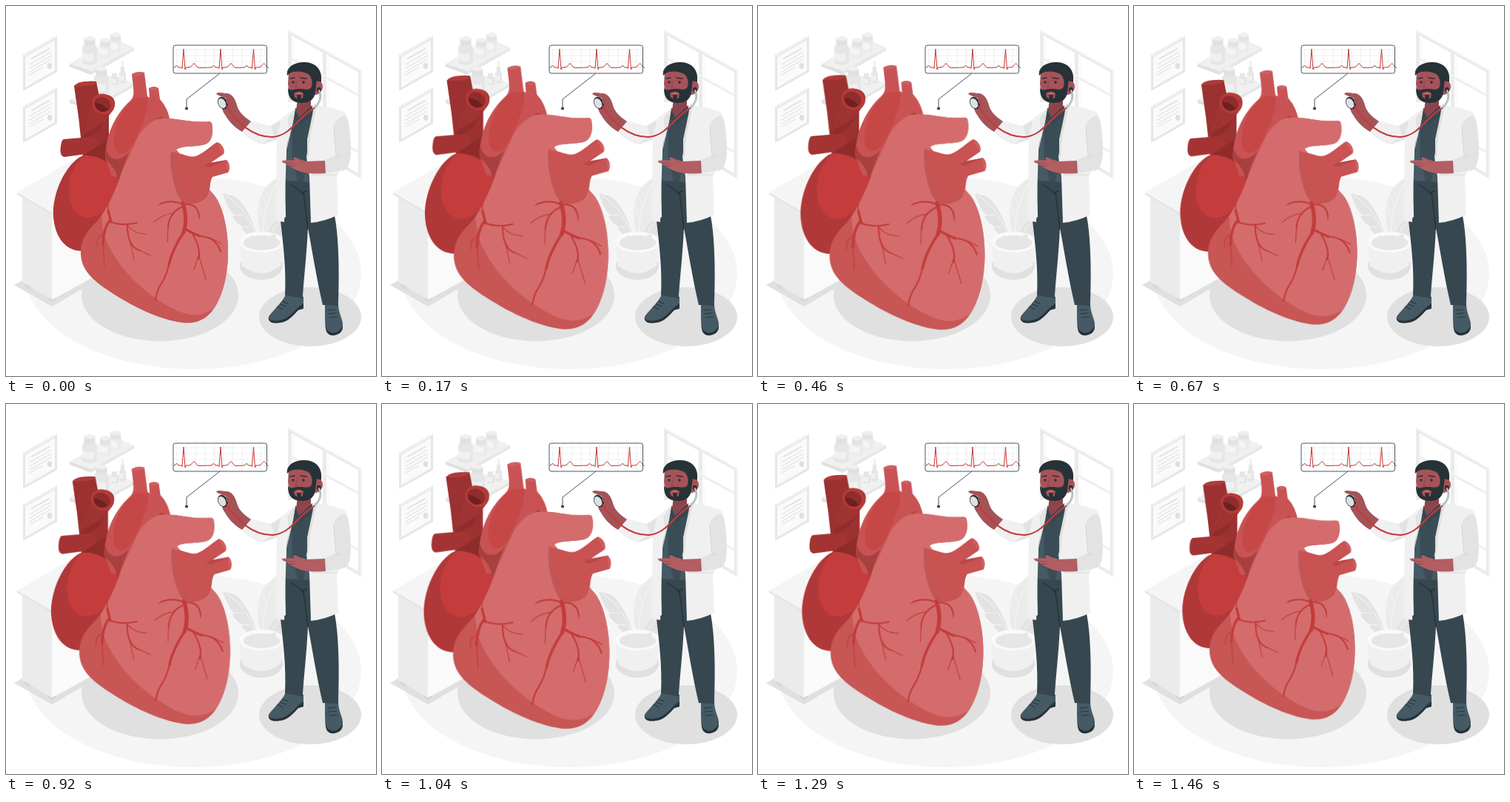
Recreate the animation shown at these times as an HTML page. Size 500 px wide and 500 px high, loop 1.54 s.

```html
<!DOCTYPE html>
<html lang="en">
<head>
<meta charset="utf-8">
<title>Heart check</title>
<style>
html, body { margin: 0; height: 100%; overflow: hidden; background: #fff; }
svg { display: block; width: 100vw; height: 100vh; }
#heart { transform-origin: 183px 258.5px; }
.line { fill: none; stroke-linecap: round; stroke-linejoin: round; }
.skin { fill: #a65358; }
.dark { fill: #263238; }
</style>
</head>
<body>
<svg viewBox="0 0 500 500">
  <defs>
    <g id="paper">
      <path fill="#e6e6e6" d="M23 66 69 40V89L23 115Z"/>
      <path fill="#f0f0f0" d="M23 66 69 40 67 44 25 68Z"/>
      <path fill="#fafafa" d="M26 69 66 46V87L26 110Z"/>
      <path class="line" stroke="#e0e0e0" stroke-width="2" d="M35 71 58 58"/>
      <path class="line" stroke="#e3e3e3" stroke-width="1.2" d="M32 79 61 62M32 84 61 67M32 89 61 72M32 93 50 83"/>
      <ellipse cx="59" cy="81" rx="3.2" ry="4" fill="#e0e0e0"/>
    </g>
    <g id="jar">
      <path fill="#ebebeb" d="M-8 0V14A8 4 0 0 0 8 14V0Z"/>
      <path fill="#f5f5f5" d="M-8 4V11A8 4 0 0 0 3 14V7Z"/>
      <path fill="#e3e3e3" d="M-7-6V0A7 3.500 0 0 0 7 0V-6Z"/>
      <ellipse cy="-6" rx="7" ry="3" fill="#f0f0f0"/>
    </g>
    <g id="bottle">
      <path fill="#e6e6e6" d="M-7-1C-7 2-10 2-10 6V24A10 5 0 0 0 10 24V6C10 2 7 2 7-1Z"/>
      <path fill="#f0f0f0" d="M-10 9A10 5 0 0 0 6 13V23A10 5 0 0 1-10 19Z"/>
      <path fill="#e0e0e0" d="M-7.500-7V-1A7.500 3.500 0 0 0 7.500-1V-7Z"/>
      <ellipse cy="-7" rx="7.500" ry="3" fill="#f0f0f0"/>
    </g>
    <g id="shelf">
      <path fill="#f0f0f0" d="M86 78 145 44 173 56 115 88Z"/>
      <path fill="#e0e0e0" d="M86 78 115 88V93L86 82Z"/>
      <path fill="#e6e6e6" d="M115 88 173 56V60L115 93Z"/>
    </g>
    <path id="body" d="M278 158C281 172 278 184 269 187 255 191 238 188 230 194L278 252C293 266 301 304 300 337 299 370 291 394 281 409 271 424 256 430 239 428 206 424 168 404 142 387 116 370 101 356 101 333 101 318 108 306 119 295 132 282 143 262 154 232 164 198 182 160 205 153 229 149 244 159 275 156Z"/>
    <clipPath id="inBody"><use href="#body"/></clipPath>
  </defs>

  <!-- room -->
  <ellipse cx="253" cy="361" rx="227" ry="130" fill="#f5f5f5"/>
  <ellipse cx="208" cy="391" rx="106" ry="62" fill="#e0e0e0"/>
  <ellipse cx="411" cy="420" rx="69" ry="40" fill="#e0e0e0"/>
  <use href="#paper"/>
  <use href="#paper" y="70"/>

  <use href="#shelf"/>
  <use href="#bottle" x="113" y="51"/>
  <use href="#jar" x="148" y="45"/>
  <use href="#jar" x="134" y="52"/>
  <use href="#shelf" y="49"/>
  <use href="#bottle" x="129" y="92"/>
  <path fill="#e6e6e6" d="M143 91H150V95L152 97V107H142V97L143 95ZM155 82H160V88L162 91V103Q157 107 153 103V91L155 88Z"/>
  <path fill="#f0f0f0" d="M142 99H149V105H142ZM156 74H159V82H156ZM153 94H159V101H153Z"/>

  <g fill="#ebebeb">
    <path d="M381 32 481 87V92L386 40V130H381Z"/>
    <path d="M476 88H481V234L460 222V217L476 226Z"/>
    <path d="M428 60H433V150H428ZM386 69 476 118V122L386 73ZM455 184 476 195V199L455 188Z"/>
  </g>
  <path class="line" stroke="#f7f7f7" stroke-width="1.500" d="M382 33 480 87V232M388 42V110M435 66V140M386 70 476 119M458 188 476 197"/>

  <path fill="#e0e0e0" d="M11 377 30 366 107 345V380L62 406Z"/>
  <path fill="#f5f5f5" d="M15 252 115 194 190 230 62 279Z"/>
  <path fill="#ebebeb" d="M22 256 62 279V397L22 373Z"/>
  <path fill="#fafafa" d="M62 279 130 240V360L62 397Z"/>
  <path fill="#e6e6e6" d="M15 252 62 279V283L15 255Z"/>
  <path fill="#f0f0f0" d="M62 279 130 240V244L62 283Z"/>
  <path fill="#d6d6d6" d="M25 375 33 379V382L25 378ZM57 394 62 397 67 394V397L62 400 57 397Z"/>

  <ellipse cx="345" cy="351" rx="29" ry="19" fill="#e0e0e0"/>
  <path fill="#e3e3e3" d="M341 322C338 300 330 280 315 262Q306 254 293 254C298 266 300 274 308 282 303 284 312 295 320 298 316 302 330 312 341 322Z"/>
  <path fill="#ebebeb" d="M346 321C340 290 336 268 350 246Q360 235 372 229V300Q360 316 346 321Z"/>
  <path fill="#e3e3e3" d="M350 321C352 306 358 294 372 284V318Z"/>
  <path class="line" stroke="#f7f7f7" d="M341 322Q330 276 297 256M347 320Q345 270 369 234M351 321Q356 305 370 292M320 283 306 282M330 299 319 298M347 287 343 270M351 268 347 256"/>
  <path fill="#f0f0f0" d="M315 318 319 351Q345 371 371 351L376 318Z"/>
  <ellipse cx="345.500" cy="319" rx="30.500" ry="14" fill="#fafafa"/>
  <ellipse cx="345.500" cy="320" rx="25" ry="10" fill="#e6e6e6"/>
  <path fill="#e6e6e6" d="M330 312Q337 306 342 326H348Q352 308 365 309L362 322Q345 331 330 324Z"/>

  <!-- monitor -->
  <rect x="226" y="53" width="126.500" height="38" rx="3" fill="#fff"/>
  <path id="grid" class="line" stroke="#ebebeb" stroke-width=".8"/>
  <path id="trace" class="line" stroke="#c33a37"/>
  <rect x="226" y="53" width="126.500" height="38" rx="3" fill="none" stroke="#455a64"/>
  <path class="line" stroke="#455a64" d="M289 91 244 126V138"/>
  <circle cx="244" cy="138.500" r="2.100" fill="#37474f"/>

  <g id="heart">
    <!-- left vessels -->
    <path fill="#9b3131" d="M92 108Q106 100 122 102L126 122 139 140V212L104 205 98 150Z"/>
    <path fill="#b03a3a" d="M92 108Q97 102 108 102T122 103Q121 107 110 108T92 108Z"/>
    <path fill="#a03333" d="M117 133C119 122 131 117 140 121 149 125 149 136 143 143L120 172 104 182 108 160Z"/>
    <path fill="#7f2525" d="M122 147 109 171 131 158 138 146 126 168 108 180 104 178Z" opacity=".45"/>
    <ellipse cx="131.500" cy="132.500" rx="15.500" ry="13.500" transform="rotate(25 131.500 132.500)" fill="#b53b3a"/>
    <ellipse cx="130.500" cy="133" rx="11.500" ry="9.500" transform="rotate(25 130.500 133)" fill="#8f2c2c"/>
    <path fill="#6f2020" d="M120 131Q130 131 138 140 132 146 125 141 120 137 120 131Z"/>
    <path fill="#a43434" d="M78 180 114 177Q124 178 123 187 122 198 108 200L79 204Q72 203 74 189 75 181 78 180Z"/>
    <path fill="#8e2b2b" d="M107 200 139 180V240H110Z"/>
    <!-- left chamber -->
    <path fill="#b03838" d="M105 202C88 207 67 239 64 273 62 304 76 333 105 331 130 315 152 270 154 230 146 212 125 201 105 202Z"/>
    <path fill="#c43d3c" d="M107 202C92 211 83 234 85 255 87 276 98 286 111 286 132 286 151 259 153 230 145 213 125 203 107 202Z"/>
    <!-- upper chamber -->
    <path fill="#c95354" d="M170 92Q178 87 187 90L191 122 194 124 193 111Q200 107 206 111L208 126Q220 139 222 158L160 232 143 230 134 205C135 175 146 148 168 128 174 122 173 116 170 92Z"/>
    <path fill="#a94040" d="M135 192C139 208 152 214 168 196 178 178 190 158 212 149L170 232 150 234Q151 222 134 207Z"/>
    <path fill="#c5433f" d="M176 123C156 137 144 165 146 187 150 207 165 200 173 185 184 161 194 140 191 124Z" opacity=".65"/>
    <path fill="#d46c6c" d="M170 92Q178 87 187 90 187 93 179 94T170 92ZM193 111Q200 108 206 111 204 114 199 114Z" opacity=".55"/>
    <!-- main body -->
    <use href="#body" fill="#c75655"/>
    <path clip-path="url(#inBody)" fill="#d46c6d" d="M310 130V360C294 416 260 425 232 412 190 393 147 352 133 310Q130 298 129 284L200 130Z"/>
    <path fill="#b74a4b" d="M223 196C220 215 227 254 239 265 250 270 266 266 272 257L275 235 240 205Z" opacity=".65"/>
    <path fill="#c95252" d="M226 198C240 199 246 205 256 203 266 200 278 188 285 184 291 185 297 194 294 200L275 213 298 208C303 212 303 222 300 225L279 231C274 239 278 248 271 256 263 265 249 266 242 262 234 248 228 222 225 203Z"/>
    <path fill="#b94647" d="M294 200 275 212 298 208 275 218 268 216Z"/>
    <path fill="#d16061" d="M285 184Q287 191 294 200 297 193 285 184ZM298 208Q297 217 300 225 304 218 298 208Z"/>
    <g class="line" stroke="#c23c3a">
      <path stroke-width="5" d="M239 266Q246 288 240 306"/>
      <path stroke-width="3.300" d="M240 306Q224 330 220 350M140 290Q132 300 131 322M138 276 142 292M243 302Q254 308 262 311"/>
      <path stroke-width="2" d="M220 350C214 378 206 372 202 397M239 268Q224 261 209 267M239 271Q220 279 219 300M240 268Q259 266 261 284M252 308Q264 328 260 342M262 311Q284 312 290 332M140 291Q156 298 177 293M164 296Q164 325 180 330"/>
      <path stroke-width="1.100" d="M209 267 206 269M219 300 218 319M227 280Q212 281 200 292M261 284V288M275 313 291 321M260 335Q265 352 270 369M260 338 254 356M131 322 133 351M134 308Q122 310 123 325M163 295Q172 308 190 308M180 330 195 337M168 320 173 343M138 276V266"/>
    </g>
  </g>

  <!-- doctor -->
  <path class="dark" d="M376 395 402 397V409L395 411C390 416 384 424 375 427 364 430 353 429 355 420Z"/>
  <path fill="#455a64" d="M378 390 402 393V402C392 408 387 418 376 423 366 427 354 426 355 420 360 411 371 405 378 390Z"/>
  <path class="dark" d="M431 414 455 432C456 442 447 446 439 445 430 442 432 433 431 414Z"/>
  <path fill="#455a64" d="M431 403 449 402C449 416 456 424 455 432 450 443 440 444 434 438 431 430 433 424 431 416Z"/>
  <path class="line" stroke="#263238" d="M374 399 381 402M371 403 378 406M367 406 374 410M435 411 445 410M436 416 446 415M437 421 448 420"/>
  <path fill="#37474f" d="M377 232 412 234 414 286 444 283C451 320 450 370 449 405L428 404C420 370 414 332 408 300 406 342 402 372 401 395L377 391C379 352 374 320 371 290L378 285Z"/>
  <path class="line" stroke="#263238" stroke-width="1.500" d="M386 242 402 253 408 301M399 253 407 250"/>
  <path fill="#455a64" d="M391 138 415 140 413 238 377 236 380 175Z"/>
  <path fill="#37474f" d="M389 142 394 150 405 158 414 142 412 184 402 237H394L387 206 386 162Z" opacity=".7"/>
  <path fill="#8f444b" d="M394 125 412 122 412 137 397 151 392 142Z"/>
  <path fill="#37474f" d="M390 138 396 151 414 134 413 148 399 161 388 150Z"/>

  <path fill="#f0f0f0" d="M331 155 357 162C370 156 382 143 391 138 388 160 381 176 379 194L376 292 364 290 366 180 347 187C335 185 324 177 318 169Z"/>
  <path fill="#e3e3e3" d="M358 162 371 154 366 180 347 187 362 174ZM391 138 380 152 383 169 379 195 388 157Z"/>
  <path fill="#f0f0f0" d="M418 133C435 137 452 140 458 144 464 152 466 180 466 198L447 230 449 282Q432 291 412 293L410 230 406 204Z"/>
  <path fill="#e0e0e0" d="M417 133 429 141 431 163 422 170 424 177 407 206 407 180Z"/>
  <path fill="#f0f0f0" d="M420 135 432 143 433 163 425 169 426 176 409 203 411 177Z"/>
  <path fill="#e3e3e3" d="M442 162C449 149 459 144 462 154 465 168 466 186 466 199 465 214 462 221 456 222L431 226 430 208 446 202Z"/>
  <path class="line" stroke="#d6d6d6" d="M446 202 453 204M443 165 446 202M414 228 447 228"/>

  <path fill="#b25e62" d="M373 209C382 208 386 209 390 208 386 204 390 203 396 207L407 210 431 209 432 226C418 227 404 227 396 223 389 221 385 217 378 213 374 212 373 211 373 209Z"/>
  <path class="line" stroke="#8f444b" stroke-width=".8" d="M378 212 390 213M382 216 391 216"/>
  <path class="skin" d="M284 119C286 115 293 118 299 118 306 119 310 126 312 134 315 145 324 151 331 156L319 170C309 164 301 156 296 147 291 140 290 133 296 129L299 125Q289 122 284 119Z"/>
  <ellipse cx="293" cy="131" rx="6.500" ry="8.700" transform="rotate(-28 293 131)" class="dark"/>
  <ellipse cx="292" cy="131.500" rx="4.700" ry="7" transform="rotate(-28 292 131.500)" fill="#dce1e3"/>
  <path class="skin" d="M297 122 306 126 302 135 298 131Z"/>

  <!-- head -->
  <path class="skin" d="M382 90C386 82 413 82 420 94L426 104Q430 115 422 119L415 121C410 133 387 131 383 119L381 105Z"/>
  <path class="dark" d="M380 94C378 82 391 75 405 76 420 77 428 87 426 103L420 101 418 116C417 127 409 131 400 131 387 131 381 125 381 111 385 116 389 112 395 112 403 112 408 114 412 111 415 105 414 99 410 93 403 88 391 87 383 91Z"/>
  <path class="skin" d="M389 118Q396 113 402 118L401 124Q395 128 390 123Z"/>
  <path class="dark" d="M393 120H399L398 127H394Z"/>
  <path fill="#c06a6e" d="M392 118Q396 116 400 118 397 121 392 118Z"/>
  <path class="line" stroke="#263238" stroke-width="1.500" d="M384 98 390 97M398 97 406 98"/>
  <path class="line" stroke="#8f444b" d="M394 101 391 110 395 110"/>
  <circle cx="388" cy="103" r="1.700" class="dark"/>
  <circle cx="402" cy="103" r="1.700" class="dark"/>
  <ellipse cx="423.500" cy="109" rx="4.500" ry="7" class="skin"/>
  <path class="dark" d="M420 111Q424 108 426 112L424 117 420 115Z"/>

  <!-- stethoscope -->
  <path class="line" stroke="#607078" stroke-width="2.300" d="M423 114C427 123 425 130 417 137"/>
  <path class="line" stroke="#e0e0e0" stroke-width="1.300" d="M423 114C427 123 425 130 417 137"/>
  <path class="line" stroke="#c33a3b" stroke-width="2.100" d="M298 135C311 157 334 178 361 177 386 174 392 153 416 138"/>
</svg>
<script>
const LOOP = 1540, TICKS = 37;
const $ = id => document.getElementById(id);

let grid = '';
for (let x = 231; x < 352; x += 12.6) grid += `M${x} 54V90`;
for (let y = 59; y < 91; y += 8) grid += `M227 ${y}H352`;
$('grid').setAttribute('d', grid);

const spike = x => `L${x - 12} 83q2.5-5 5 0h4l1 1.5 2-26.500 2 28 1-3h4q3 0 5-3.500t4 0 4 4`;
$('trace').setAttribute('d', 'M227 83' + [240, 290, 334.5].map(spike).join(''));

// Swell rises and falls linearly around a peak, counted in ticks
const pulse = (tick, peak, rise, fall) =>
  Math.max(0, 1 - (tick < peak ? (peak - tick) / rise : (tick - peak) / fall));
const scaleAt = tick => {
  const swell = Math.max(pulse(tick, 7, 8, 12), pulse(tick, 27, 8, 8));
  return (1 + .1 * swell) / 1.0125;
};
const frames = Array.from({ length: TICKS + 1 }, (_, tick) => ({
  offset: tick / TICKS,
  transform: `scale(${scaleAt(tick)})`,
  easing: 'step-end'
}));
$('heart').animate(frames, { duration: LOOP, iterations: Infinity });
</script>
</body>
</html>
```
